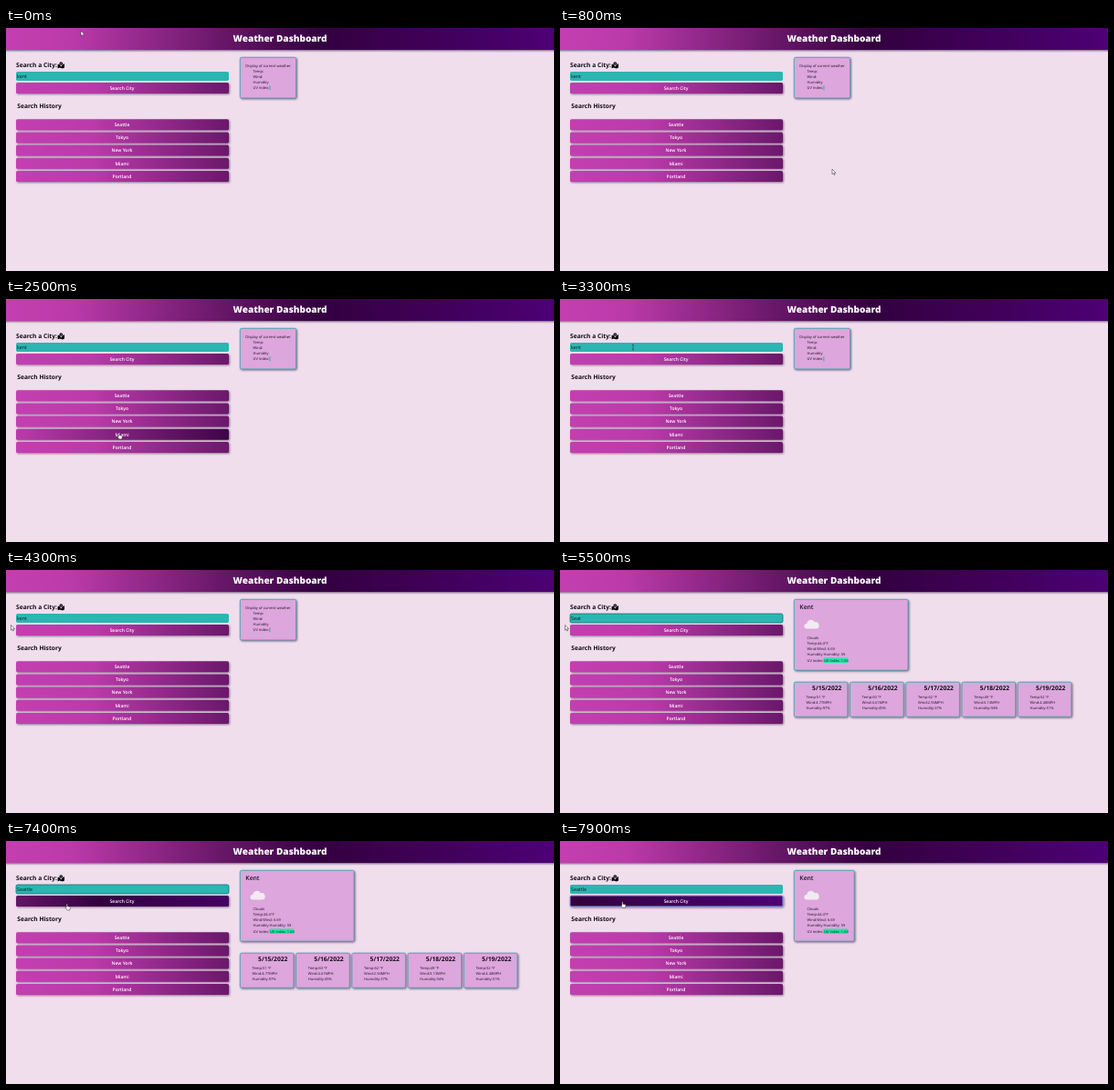
An HTML page that plays this animation: 600x267 px, repeating every 8 s.

```html
<!DOCTYPE html>
<html lang="en">
<head>
<meta charset="utf-8">
<title>Weather Dashboard</title>
<style>
  html, body { margin: 0; width: 100%; height: 100%; overflow: hidden; background: #f0deed; }
  svg { display: block; width: 600px; height: 267px; }
  text { font-family: "Open Sans", "Noto Sans", sans-serif; font-size: 4px; fill: #20122a; text-rendering: geometricPrecision; }
  .title { font-size: 10px; font-weight: 800; fill: #fff; text-anchor: middle; }
  .head { font-size: 6.7px; font-weight: 700; fill: #140c18; }
  .label { font-size: 5px; font-weight: 600; fill: #fff; text-anchor: middle; }
  .entry { font-size: 5.3px; font-weight: 500; fill: #0c1a1e; }
  .city { font-size: 6.8px; font-weight: 600; }
  .date { font-size: 6.7px; font-weight: 700; fill: #140c18; }
  .card { fill: #dda6dc; stroke: #4aa5b4; stroke-width: .9; filter: drop-shadow(1px 1px 1px rgba(50, 20, 60, .6)); }
  .button { filter: drop-shadow(1px 1.2px 1px rgba(60, 20, 70, .55)); }
  .bar { filter: drop-shadow(0 1px 1.2px rgba(40, 10, 50, .65)); }
</style>
</head>
<body>
<svg viewBox="0 0 600 267">
  <defs id="defs"></defs>
  <g id="page"></g>
  <g id="before"></g>
  <g id="after"></g>
  <g id="forecast"></g>
  <g id="pointer" fill="#fff" stroke="#222" stroke-width=".5">
    <path id="arrow" d="M0 0V5.6L1.3 4.5L2.2 6.5L3.1 6.1L2.2 4.2H4Z"/>
    <path id="hand" d="M1.2 .6Q1.9 0 2.3 .8V2.7L4.8 3.3Q5.5 3.6 5.3 4.6L4.7 7H2L.1 4.5Q0 3.7 1.2 4.3Z"/>
    <path id="beam" d="M-1 -2.8H1M0 -2.8V2.8M-1 2.8H1"/>
  </g>
</svg>
<script>
const LOOP = 8000, STEP = 100;
const LOADED = 5200, FOCUS = 4900, CLICK = 7900;
const LEFT = 11, WIDTH = 233, HEIGHT = 12, ZOOM = 2.4, LINE = 6.05;
const $ = id => document.getElementById(id);
const [page, before, after, forecast] = ["page", "before", "after", "forecast"].map($);

function add(parent, tag, attrs, text = "") {
  const node = document.createElementNS("http://www.w3.org/2000/svg", tag);
  set(node, attrs);
  node.textContent = text;
  return parent.appendChild(node);
}
function set(node, attrs) {
  for (const key in attrs) node.setAttribute(key, attrs[key]);
}
const show = (node, on) => { node.style.display = on ? "" : "none"; };
const write = (parent, x, y, text, cls = "") => add(parent, "text", { x, y, class: cls }, text);
const list = (parent, x, y, lines) => lines.forEach((s, i) => write(parent, x, y + i * LINE, s));
const box = (parent, x, y, width, height, attrs) => add(parent, "rect", { x, y, width, height, ...attrs });
const panel = (parent, x, y, w, h) => box(parent, x, y, w, h, { rx: 1.5, class: "card" });

function gradient(id, flat, dark) {
  const g = add($("defs"), "linearGradient", { id, gradientUnits: "userSpaceOnUse", x1: 0, x2: 600 });
  const stop = (offset, color) => add(g, "stop", { offset, "stop-color": color });
  stop(0, "#c33fb1");
  stop(flat, "#bb3aaa");
  stop(dark, "#33003f");
  stop(1, "#4d0074");
  return g;
}

// Header and search column
gradient("barFill", .12, .57);
box(page, -4, -4, 608, 28, { fill: "url(#barFill)", class: "bar" });
write(page, 300, 14.8, "Weather Dashboard", "title");
write(page, 11, 43.4, "Search a City:", "head");
write(page, 12.3, 87.8, "Search History", "head");
add(page, "path", { d: "M56.6 40.2L58.2 39.5L60.3 42.6L62.4 39.8L64 39.2V43.6L61.8 44.4L58.8 43.5L56.6 44.3Z" });
add(page, "circle", { cx: 60.3, cy: 39, r: 1.2, fill: "none", stroke: "#140c18", "stroke-width": 1.3 });

const field = box(page, LEFT, 48, WIDTH, 10, { rx: 1.8, fill: "#2bb6b1", "stroke-width": .8 });
const entry = write(page, 12, 55.2, "", "entry");

const buttons = ["Search City", "Seattle", "Tokyo", "New York", "Miami", "Portland"].map((name, i) => {
  const y = i ? 86 + i * 14.2 : 60;
  const fill = gradient("fill" + i, .15, .6);
  const rect = box(page, LEFT, y, WIDTH, HEIGHT, { rx: 1.6, fill: `url(#fill${i})`, class: "button" });
  write(page, 127, y + 7.8, name, "label");
  return { y, fill, rect };
});

// Current weather, empty and filled
panel(before, 256.3, 32.3, 61.2, 44.6);
write(before, 262.3, 43.3, "Display of current weather");
list(before, 270.5, 49.3, ["Temp:", "Wind:", "Humidity", "UV Index:"]);
box(before, 288.4, 63.2, 1, 5, { fill: "#22b5a8" });

const card = panel(after, 256.3, 32.3, 124.7, 77.8);
write(after, 262.3, 43, "Kent", "city");
add(after, "path", { d: "M270.3 64.6A2.8 2.8 0 0 1 270.2 59A4.6 4.6 0 0 1 278.8 57.2A3.7 3.7 0 0 1 280.8 64.6Z", fill: "#f1ebf2" });
list(after, 270.5, 76.3, ["Clouds", "Temp:44.4°F", "Wind:Wind: 6.69", "Humidity Humidity: 59", "UV index:"]);
box(after, 288.3, 96.6, 27, 5.3, { rx: .8, fill: "#22e6a4" });
write(after, 289.2, 100.5, "UV index: 1.63");

["51 4.77 97", "60 4.61 45", "62 2.94 37", "49 5.13 94", "52 4.48 51"].forEach((day, i) => {
  const x = 256.3 + i * 61.25, [temp, wind, wet] = day.split(" ");
  panel(forecast, x, 123.2, 58.6, 38);
  write(forecast, x + 19.8, 132.4, `5/${15 + i}/2022`, "date");
  list(forecast, x + 13.3, 140.6, [`Temp:${temp} °F`, `Wind:${wind}MPH`, `Humidity:${wet}%`]);
});

// Pointer waypoints: time, x, y
const path = [
  [0, 82, 3], [600, 200, 165], [900, 347, 150], [1200, 586, 40], [1400, 313, 30], [1600, 290, 14],
  [1900, 305, 109], [2200, 170, 173], [2500, 122, 147], [2800, 276, 45], [2900, 210, 14],
  [3300, 80, 53], [3700, 1, 160], [4200, 314, 81], [4300, 5.5, 60.5], [6200, 5.5, 60.5],
  [6500, 120, 162], [6900, 434, 60], [7100, 200, 8], [7200, 100, 62], [7400, 65, 69], [LOOP, 67, 66]
];
function pointAt(t) {
  const i = path.findIndex(p => p[0] > t);
  const [t0, x0, y0] = path[i - 1], [t1, x1, y1] = path[i];
  const k = (t - t0) / (t1 - t0);
  return { x: x0 + (x1 - x0) * k, y: y0 + (y1 - y0) * k };
}
const inside = (p, y, h) => p.x >= LEFT && p.x <= LEFT + WIDTH && p.y >= y && p.y <= y + h;

// Each button's gradient glides while the pointer is over it, and back after
const hover = [];
for (let t = 0, levels = buttons.map(() => 0); t < LOOP; t += STEP) {
  const p = pointAt(t);
  levels = levels.map((v, i) => Math.max(0, Math.min(1, v + (inside(p, buttons[i].y, HEIGHT) ? .25 : -.25))));
  hover.push(levels);
}

function draw(t) {
  const p = pointAt(t), levels = hover[t / STEP];
  const loaded = t >= LOADED, clicked = t >= CLICK;

  buttons.forEach(({ fill }, i) => {
    const x1 = LEFT - levels[i] * WIDTH * (ZOOM - 1);
    set(fill, { x1, x2: x1 + WIDTH * ZOOM });
  });
  entry.textContent = loaded ? "Seattle".slice(0, (t - LOADED) / STEP + 1) : "kent";
  set(field, { stroke: t >= FOCUS && !clicked ? "#176f78" : "none" });
  set(buttons[0].rect, { stroke: clicked ? "#7fa6ee" : "none" });

  show(before, !loaded);
  show(after, loaded);
  show(forecast, loaded && !clicked);
  set(card, { width: clicked ? 65.8 : 124.7 });

  const onButton = buttons.some(b => inside(p, b.y, HEIGHT)), onField = inside(p, 48, 10);
  show($("hand"), onButton);
  show($("beam"), onField);
  show($("arrow"), !onButton && !onField);
  set($("pointer"), { transform: `translate(${p.x} ${p.y})` });
}

const start = performance.now();
function tick() {
  const t = (performance.now() - start) % LOOP;
  draw(Math.floor(t / STEP) * STEP);
  requestAnimationFrame(tick);
}
tick();
</script>
</body>
</html>
```
